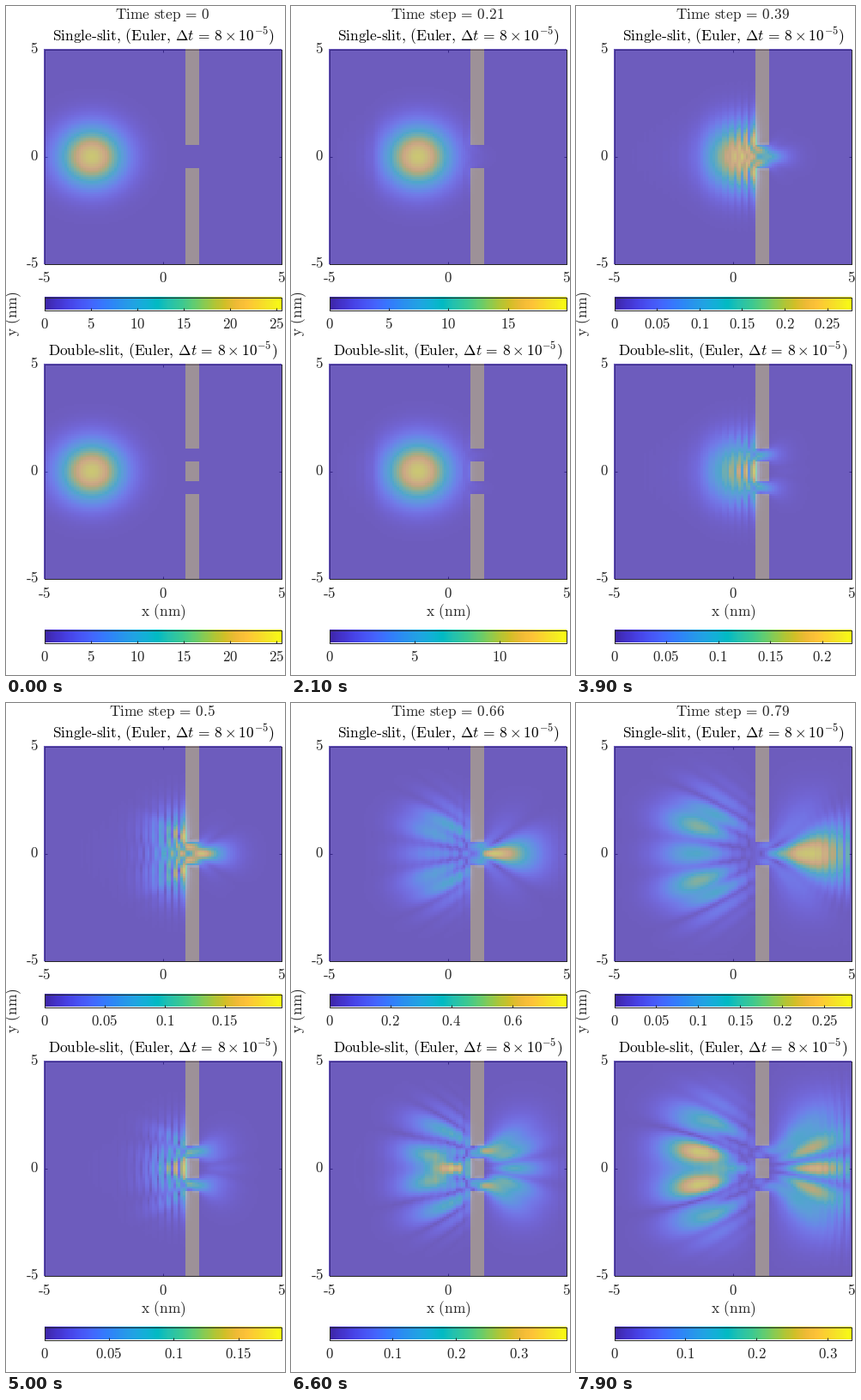
A matplotlib script for the animation above (8000 ms loop, 325 by 780 pixels).

```python
import numpy as np
import matplotlib.pyplot as plt
from matplotlib.animation import FuncAnimation
from matplotlib.colors import LinearSegmentedColormap
from matplotlib.patches import Rectangle

W, H, DPI = 325, 780, 100
FRAMES, INTERVAL = 80, 100
INK = "#262626"
LEFT, RIGHT = 44.5, 320.5
WALL = 100.0

plt.rcParams["mathtext.fontset"] = "cm"

PARULA = LinearSegmentedColormap.from_list("parula", [
    (.242, .150, .660), (.265, .198, .795), (.278, .256, .899),
    (.281, .323, .958), (.270, .389, .991), (.221, .460, .997),
    (.179, .529, .968), (.154, .590, .922), (.125, .646, .888),
    (.069, .695, .839), (.007, .731, .766), (.141, .758, .684),
    (.216, .784, .592), (.341, .801, .479), (.504, .799, .348),
    (.672, .779, .223), (.820, .750, .154), (.939, .729, .210),
    (.997, .766, .220), (.979, .839, .177), (.960, .914, .142),
    (.977, .984, .081)], N=256)

# Wave packet hitting a wall, on a finite-difference grid
N, DX = 101, 0.1
SUBSTEPS = 8
DT = 0.01 / SUBSTEPS
grid = np.linspace(-5, 5, N)
X, Y = np.meshgrid(grid, grid)
in_wall = (X > 0.95) & (X < 1.55)
single_wall = WALL * (in_wall & (abs(Y) > 0.55))
double_wall = WALL * (in_wall & ((abs(Y) < 0.45) | (abs(Y) > 1.05)))


def kinetic_step():
    n = N - 2
    T = (2 * np.eye(n) - np.eye(n, k=1) - np.eye(n, k=-1)) / (2 * DX ** 2)
    energy, modes = np.linalg.eigh(T)
    return (modes * np.exp(-1j * energy * DT)) @ modes.T


def evolve(wall, sigma=0.96, k0=10):
    """Amplitude in every frame, scaled to a peak of one."""
    inner = (slice(1, -1), slice(1, -1))
    K = kinetic_step()
    half = np.exp(-0.5j * DT * wall[inner])
    psi = np.exp(-((X + 3) ** 2 + Y ** 2) / (2 * sigma ** 2) + 1j * k0 * X)
    psi = psi[inner]
    out = []
    for _ in range(FRAMES):
        amp = np.pad(abs(psi), 1)
        out.append(amp / amp.max())
        for _ in range(SUBSTEPS):
            psi = half * (K @ (half * psi) @ K)
    return out


# Colour-scale maximum over time, interpolated in the logarithm
KNOTS = [0, .11, .21, .39, .50, .66, .79]
SINGLE_MAX = [25.5, 178, 19.9, .278, .197, .775, .282]
DOUBLE_MAX = [25.5, 178, 13.9, .228, .183, .374, .333]


def scale_max(t, values):
    return float(np.exp(np.interp(t, KNOTS, np.log(values))))


def tick_step(top):
    base = 10 ** np.floor(np.log10(top / 6))
    return next(m * base for m in (1, 2, 5, 10) if top / (m * base) <= 6)


def words(s):
    return r"\hspace{0.38}".join(r"\text{%s}" % w for w in s.split())


fig = plt.figure(figsize=(W / DPI, H / DPI), dpi=DPI, facecolor="white")
ax = fig.add_axes([0, 0, 1, 1])


def label(x, y, tex, px=16.8, color=INK, ha="center", va="baseline", **kw):
    return ax.text(x, y, f"${tex}$", fontsize=px * 72 / DPI, color=color,
                   ha=ha, va=va, **kw)


def line(xs, ys, z):
    return ax.plot(xs, ys, color=INK, lw=0.72, zorder=z,
                   solid_capstyle="butt")[0]


def frame(top, bottom, z):
    line([LEFT, RIGHT, RIGHT, LEFT, LEFT],
         [top, top, bottom, bottom, top], z)


class Panel:
    def __init__(self, name, top, bar_top, wall, maxima):
        self.maxima = maxima
        self.amps = evolve(wall)
        bottom, mid = top + 250, top + 125
        center = (LEFT + RIGHT) / 2

        # Axis lines lie below the translucent layers
        frame(top, bottom, 1)
        for x in (LEFT, center, RIGHT):
            line([x, x], [top, top + 3], 1)
            line([x, x], [bottom, bottom - 3], 1)
        for y in (top, mid, bottom):
            line([LEFT, LEFT + 3], [y, y], 1)
            line([RIGHT, RIGHT - 3], [y, y], 1)
        self.wall = self.layer(wall, top, 2)
        self.wave = self.layer(self.amps[0], top, 3)

        label(183, top - 9.5, words(f"{name}-slit, (Euler,")
              + r"\hspace{0.38}\Delta t\,=\,8\times 10^{-5})", 17.4, "black")
        for s, x, y in (("-5", LEFT, bottom), ("0", center, mid),
                        ("5", RIGHT, top)):
            label(x, bottom + 22, words(s))
            label(38, y + 4.5, words(s), ha="right")

        self.bar_top, self.bar_bottom = bar_top, bar_top + 15
        ax.imshow(np.linspace(0, 1, 256)[None], cmap=PARULA, aspect="auto",
                  extent=(LEFT, RIGHT, self.bar_bottom, bar_top), zorder=2)
        frame(bar_top, self.bar_bottom, 4)
        self.ticks = [(line([0, 0], [0, 0], 4),
                       label(0, self.bar_bottom + 22, words("0")))
                      for _ in range(7)]

    def layer(self, data, top, z):
        sx, sy, pad = 27.6, 25, DX / 2
        im = ax.imshow(data, cmap=PARULA, alpha=0.5, aspect="auto",
                       origin="lower", interpolation="nearest", zorder=z,
                       extent=(LEFT - pad * sx, RIGHT + pad * sx,
                               top + 250 + pad * sy, top - pad * sy))
        im.set_clip_path(Rectangle((LEFT - .5, top - .5), 277, 251,
                                   transform=ax.transData))
        return im

    def update(self, i):
        top = scale_max(i / 100, self.maxima)
        self.wave.set_data(self.amps[i] * top)
        for im in (self.wall, self.wave):
            im.set_clim(0, top)
        step = tick_step(top)
        for j, (mark, text) in enumerate(self.ticks):
            shown = j * step <= top
            mark.set_visible(shown)
            text.set_visible(shown)
            if shown:
                x = LEFT + (RIGHT - LEFT) * j * step / top
                mark.set_data([x, x], [self.bar_bottom, self.bar_bottom - 3])
                text.set_x(x)
                text.set_text(f"${words(f'{j * step:.4g}')}$")


panels = [Panel("Single", 50.5, 339.5, single_wall, SINGLE_MAX),
          Panel("Double", 417.5, 727.5, double_wall, DOUBLE_MAX)]
clock = label(182.5, 15, words("Time step = 0"), 17.3)
label(183, 711, words("x (nm)"), 17.3)
label(8.5, 359, words("y (nm)"), 17.3, va="center", rotation=90)
ax.set_xlim(0, W)
ax.set_ylim(H, 0)
ax.axis("off")


def draw(i):
    clock.set_text(f"${words(f'Time step = {i / 100:g}')}$")
    for p in panels:
        p.update(i)
    return []


anim = FuncAnimation(fig, draw, frames=FRAMES, interval=INTERVAL,
                     repeat=True, repeat_delay=0)
plt.show()
```
